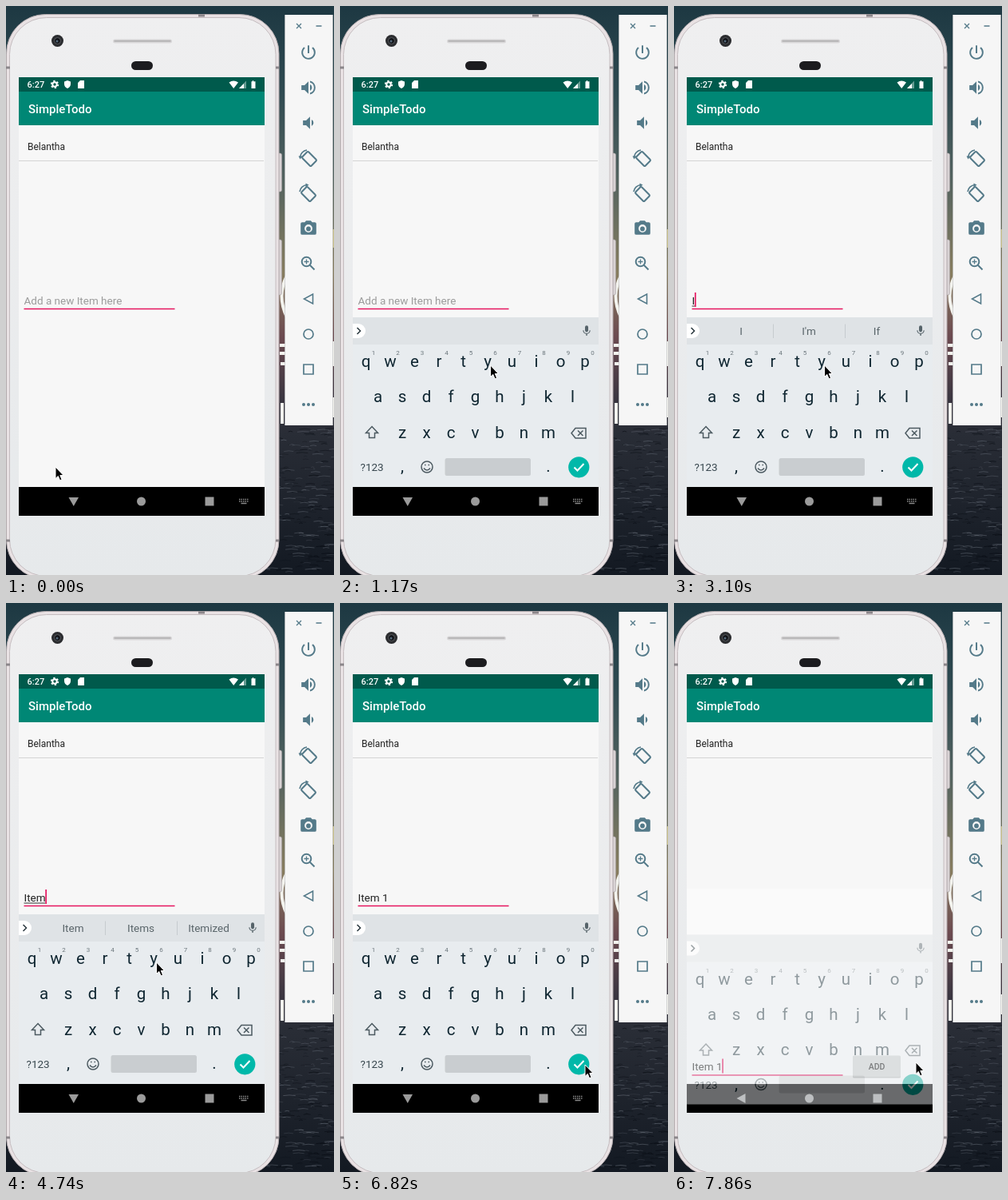
Write an HTML page that moves like this. It is 411 px wide and 711 px high and loops after 8 s.

```html
<!DOCTYPE html>
<html lang="en">
<head>
<meta charset="utf-8">
<title>Todo app demo</title>
<style>
  html, body { margin: 0; width: 100%; height: 100%; overflow: hidden; background: #10181f; }
  svg { display: block; width: 411px; height: 711px; font-family: Roboto, sans-serif; }
  .mid { text-anchor: middle; }
  .line { fill: none; stroke-width: 2; }
  #tools { fill: #547a89; }
  #tools .line { stroke: #547a89; }
  #keyboard .key { font-size: 20.5px; fill: #0f2631; }
  #keyboard .num { font-size: 8px; fill: #6a757b; }
  #words text { font-size: 13.5px; fill: #5a656a; }
</style>
</head>
<body>
<svg viewBox="0 0 411 711">
  <defs>
    <linearGradient id="sky" x2="0" y2="1">
      <stop offset="0" stop-color="#1d3842"/>
      <stop offset=".15" stop-color="#2f4a51"/>
      <stop offset=".3" stop-color="#52625f"/>
      <stop offset=".47" stop-color="#877d5f"/>
      <stop offset=".58" stop-color="#6c4a50"/>
      <stop offset=".69" stop-color="#3a3540"/>
      <stop offset=".75" stop-color="#292d36"/>
      <stop offset="1" stop-color="#131922"/>
    </linearGradient>
    <linearGradient id="shell" x2="0" y2="1">
      <stop offset="0" stop-color="#efeff0"/>
      <stop offset="1" stop-color="#e6e9eb"/>
    </linearGradient>
    <clipPath id="screenClip"><path d="M16 89H324V637H16Z"/></clipPath>
    <g id="rotate">
      <rect class="line" x="-5.500" y="-8" width="11" height="16" rx="1.500" stroke="#547a89" transform="translate(1 1) rotate(-45)"/>
      <path class="line" d="M-10.500 -1a10 10 0 0 1 8.500-9" stroke="#547a89" style="stroke-width:1.700"/>
      <path d="M-12.500 -2.500h5l-3 4Z"/>
    </g>
  </defs>

  <rect width="411" height="711" fill="url(#sky)"/>
  <g id="waves"></g>
  <g class="line" stroke="#f3f3ee" style="stroke-width:4">
    <path d="M352 337Q339 362 352 389M343 424H350M343 434H350M344 447H350M346 496V522M410 419V450M410 489V514"/>
    <path d="M410 279V302" stroke="#c9c08a"/>
  </g>

  <!-- phone shell -->
  <path d="M341 184h2.500q2 0 2 2v44q0 2-2 2H341ZM341 292h2.500q2 0 2 2v65q0 2-2 2H341Z" fill="#d9d3d5" stroke="#a9a3a6" stroke-width=".6"/>
  <rect x=".5" y="10.500" width="341.500" height="705.500" rx="49" fill="#e9e2e4" stroke="#b3abae"/>
  <rect x="4.500" y="14.500" width="333.500" height="698" rx="46" fill="url(#shell)" stroke="#c4bcbf"/>
  <path d="M241 12h8M0 77h5M338 77h4M0 668h5M338 668h4" stroke="#8b868a" stroke-width="3"/>
  <rect x="134" y="41.500" width="74" height="5" rx="2.500" fill="#d9d8d9"/>
  <path d="M135.500 43.800H206.500" stroke="#b5b3b4" stroke-width="2"/>
  <circle cx="64.500" cy="43.500" r="7.500" fill="#2b2c2f"/>
  <circle cx="64.500" cy="43.500" r="4" fill="#111318" stroke="#5a5c5f"/>
  <circle cx="64" cy="44" r="1.500" fill="#55697a"/>
  <rect x="157" y="69" width="27" height="11" rx="5.500" fill="#1c1c1f"/>

  <g clip-path="url(#screenClip)">
    <path d="M16 149H324V601H16Z" fill="#f7f7f7"/>
    <path d="M16 89H324V107H16Z" fill="#005a4c"/>
    <path d="M16 107H324V149H16Z" fill="#008775"/>
    <g fill="#fff">
      <text x="26.500" y="102" font-size="11" font-weight="500">6:27</text>
      <circle class="line" cx="61" cy="98" r="2.700" stroke="#fff"/>
      <circle class="line" cx="61" cy="98" r="4.200" stroke="#fff" stroke-dasharray="2.200"/>
      <path d="M77 93l4 1.600v3q0 3.800-4 5.400q-4-1.600-4-5.400v-3ZM93 93h5v10h-8v-7ZM279.500 95.500q5.500-4 11.500 0L285.200 103ZM310 93v1.200h2.500V103h-5V94.200H309V93Z"/>
      <path d="M301 93.500V103h-9Z" opacity=".4"/><path d="M298 97v6h-6Z"/>
      <text x="28" y="134" font-size="15" font-weight="500">SimpleTodo</text>
    </g>
    <text x="27" y="180" font-size="12" fill="#222">Belantha</text>
    <path d="M16 193.500H323" stroke="#d4d4d4"/>

    <path id="freed" d="M16 357H324V601H16Z" fill="#fafafa"/>
    <g id="field">
      <text id="entry" x="22.500" y="372.500" font-size="13.500"></text>
      <path id="composing" stroke="#333" stroke-width="1"/>
      <path d="M22.500 378.500H211.500" stroke="#e6165f" stroke-width="1.300"/>
      <rect id="caret" y="358" width="1.700" height="18" fill="#e6165f"/>
      <g id="add">
        <rect x="224" y="355" width="60" height="27" rx="1.500" fill="#bfc1c1"/>
        <rect x="224" y="354" width="60" height="26.500" rx="1.500" fill="#d3d5d5"/>
        <text class="mid" x="254" y="371.500" font-size="10.500" font-weight="500" fill="#222">ADD</text>
      </g>
    </g>

    <path d="M16 601H324V637H16Z"/>
    <g fill="#9b9b9b">
      <path id="back"/>
      <circle cx="169.500" cy="619" r="5.500"/>
      <path d="M249.500 613.500h11v11h-11Z"/>
      <g id="imeIcon" class="line" stroke="#8b8b8b" style="stroke-width:1.500">
        <path d="M292 616.500h12M292 619h12" stroke-dasharray="1.500 1"/>
        <path d="M294.500 621.500h7"/>
      </g>
    </g>

    <g id="keyboard">
      <path d="M16 389H324V601H16Z" fill="#e8ecef"/>
      <path d="M16 389H324V423H16Z" fill="#dfe3e6"/>
      <path d="M16 397h7a9 9 0 0 1 0 18h-7Z" fill="#fff"/>
      <path class="line" d="M21.500 402l4 4-4 4" stroke="#28363d" style="stroke-width:1.500"/>
      <g id="words">
        <path d="M124.500 397.500V415M214.500 397.500V415" stroke="#c6cbcf"/>
        <text class="mid" x="84" y="411"></text>
        <text class="mid" x="169" y="411"></text>
        <text class="mid" x="254" y="411"></text>
      </g>
      <path transform="translate(301 398) scale(.67)" fill="#56636a" d="M12 14a3 3 0 0 0 3-3V5a3 3 0 0 0-6 0v6a3 3 0 0 0 3 3zm5.300-3a5.300 5.300 0 0 1-10.600 0H5a7 7 0 0 0 6 6.720V21h2v-3.280A7 7 0 0 0 19 11z"/>
      <g id="keys"></g>
      <g class="line" stroke="#4c5a61" style="stroke-width:1.500">
        <path d="M40 525.500l7.500 8h-4v6h-7v-6h-4Z"/>
        <path d="M295 527.500h13v12.500h-13l-5-6.250ZM298 530.500l6.500 6.500M304.500 530.500l-6.500 6.500"/>
        <circle cx="109" cy="576" r="7"/>
        <path d="M105 577.500q4 5 8 0M106 573.500h1.500M110.500 573.500h1.500"/>
      </g>
      <text x="25.500" y="581" font-size="13.500" fill="#37464e">?123</text>
      <text class="key mid" x="78" y="582">,</text>
      <text class="key mid" x="261" y="582">.</text>
      <rect x="131.500" y="565" width="107.500" height="22" rx="2.500" fill="#c9cdd0"/>
      <circle id="done" cx="299.300" cy="576.300" r="13.100"/>
      <path class="line" d="M293.500 576.500l4 4 8-8.500" stroke="#fff"/>
    </g>
  </g>

  <!-- emulator tool strip -->
  <path d="M350 11H409V524H350Z" fill="#f6f6f6"/>
  <path d="M349.500 11V524M409.500 11V524" stroke="#c9cbcc" stroke-width=".8"/>
  <g id="tools">
    <path class="line" d="M364 22l6 6M370 22l-6 6M388.500 25h7" style="stroke-width:1.300"/>
    <g id="icons"></g>
    <use href="#rotate" transform="translate(379 190)"/>
    <use href="#rotate" transform="translate(378 234) scale(-1 1) rotate(90)"/>
    <circle cx="379" cy="278.500" r="2.900"/>
    <circle class="line" cx="376.500" cy="319.500" r="5.800"/>
    <path class="line" d="M380.500 323.500l6 6"/>
    <path class="line" d="M373.500 319.500h6M376.500 316.500v6" style="stroke-width:1.300"/>
    <path class="line" d="M384.500 360v12l-11-6Z" style="stroke-width:1.600"/>
    <circle class="line" cx="379" cy="410" r="6" style="stroke-width:1.700"/>
    <path class="line" d="M373 448h12v12h-12Z" style="stroke-width:1.700"/>
    <circle cx="373" cy="498" r="2"/><circle cx="379" cy="498" r="2"/><circle cx="385" cy="498" r="2"/>
  </g>

  <path id="mouse" d="M0 0V14.500L3.300 11.400 5.600 16.800 8 15.700 5.800 10.500H10Z" stroke="#fff"/>
</svg>

<script>
const LOOP = 8000;
const $ = id => document.getElementById(id);

function add(parent, tag, attrs, text = '') {
  const el = document.createElementNS('http://www.w3.org/2000/svg', tag);
  for (const name in attrs) el.setAttribute(name, attrs[name]);
  el.textContent = text;
  parent.append(el);
  return el;
}

// Static parts built from rules
let seed = 7;
const random = () => (seed = seed * 16807 % 2147483647) / 2147483647;
for (let i = 0; i < 260; i++) {
  const x = 300 + random() * 108, y = 526 + random() * 184, w = 4 + random() * 12;
  add($('waves'), 'path', {
    d: `M${x} ${y}q${w / 2} -1.5 ${w} 0`, fill: 'none',
    stroke: i % 2 ? '#6b727d' : '#05090f', opacity: .15 + random() * .4
  });
}

[['qwertyuiop', 32.5, 451], ['asdfghjkl', 47.5, 495], ['zxcvbnm', 78, 539.5]].forEach(([row, x0, y], r) => {
  [...row].forEach((letter, i) => {
    const x = x0 + i * 30.5;
    add($('keys'), 'text', { class: 'key mid', x, y }, letter);
    if (r === 0) add($('keys'), 'text', { class: 'num mid', x: x + 9.5, y: 436 }, (i + 1) % 10);
  });
});

const glyphs = [
  [58, 'M13 3h-2v10h2V3zm4.830 2.170l-1.420 1.420A6.920 6.920 0 0 1 19 12a7 7 0 1 1-11.410-5.420L6.170 5.170A9 9 0 1 0 21 12a8.940 8.940 0 0 0-3.170-6.830z'],
  [102, 'M3 9v6h4l5 5V4L7 9H3zm13.500 3A4.500 4.500 0 0 0 14 7.970v8.050A4.470 4.470 0 0 0 16.500 12zM14 3.230v2.060a7 7 0 0 1 0 13.420v2.060a9 9 0 0 0 0-17.540z'],
  [146, 'M18.500 12A4.500 4.500 0 0 0 16 7.970v8.050A4.470 4.470 0 0 0 18.500 12zM5 9v6h4l5 5V4L9 9H5z'],
  [278, 'M9 2L7.170 4H4a2 2 0 0 0-2 2v12a2 2 0 0 0 2 2h16a2 2 0 0 0 2-2V6a2 2 0 0 0-2-2h-3.170L15 2zm3 15a5 5 0 1 1 0-10 5 5 0 0 1 0 10z']
];
for (const [y, d] of glyphs) add($('icons'), 'path', { d, transform: `translate(379 ${y}) scale(.98) translate(-12 -12)` });

// Timeline: [start ms, values...]
const mousePath = [
  [0, 62, 576], [590, 74, 562], [740, 106, 525], [880, 147, 482], [1030, 179, 456], [1170, 188.5, 449],
  [5930, 238, 455], [6080, 330, 476], [6230, 347, 488], [6380, 346, 505], [6530, 337, 535],
  [6670, 321, 563], [6820, 307, 577], [6970, 303, 574]
];
const typing = [
  [0, '', 22.2], [2950, 'I', 25.9, true], [3550, 'It', 30.3, true], [3990, 'Ite', 37.4, true],
  [4740, 'Item', 49.3, true], [5190, 'Item ', 52.6], [5480, 'Item 1', 60.2]
];
const suggestions = [
  [0], [3100, 'I', "I'm", 'If'], [3700, 'It', "It's", 'Its'], [3990, 'Ite', 'Item', 'Its'],
  [4740, 'Item', 'Items', 'Itemized'], [5190, 'is', 'of', 'the'], [5480]
];
const keyboardStates = [[0, 0, 0], [140, 3, .9], [290, 0, 1], [7860, 25.5, .45]];
const caretToggles = [590, 1170, 1610, 2060, 2510, 4440, 4740, 5930, 6380, 6820, 7420];

const at = (steps, t) => steps.findLast(step => step[0] <= t).slice(1);
const show = (el, on) => el.setAttribute('visibility', on ? 'visible' : 'hidden');
const set = (id, name, value) => $(id).setAttribute(name, value);
const wordSlots = document.querySelectorAll('#words text');

function draw(t) {
  const [mx, my] = at(mousePath, t);
  set('mouse', 'transform', `translate(${mx} ${my})`);

  const [text, caretX, composing] = at(typing, t);
  $('entry').textContent = text || 'Add a new Item here';
  set('entry', 'fill', text ? '#222' : '#9c9c9c');
  set('composing', 'd', composing ? `M22.5 375H${caretX}` : '');
  set('caret', 'x', caretX);
  show($('caret'), caretToggles.filter(time => time <= t).length % 2);

  const words = at(suggestions, t);
  show($('words'), words.length);
  wordSlots.forEach((slot, i) => slot.textContent = words[i] || '');

  const [shift, opacity] = at(keyboardStates, t);
  set('keyboard', 'transform', `translate(0 ${shift})`);
  set('keyboard', 'opacity', opacity);
  set('done', 'fill', t >= 7570 ? '#00a294' : '#00b8a9');

  const closing = t >= 7860;
  set('field', 'transform', `translate(0 ${closing ? 211.5 : 0})`);
  show($('add'), closing);
  show($('freed'), closing);
  show($('imeIcon'), !closing);
  set('back', 'd', closing ? 'M89.500 613v12l-11-6Z' : 'M78.500 614h12.500l-6.250 11Z');
}

function tick() {
  draw(performance.now() % LOOP);
  requestAnimationFrame(tick);
}
tick();
</script>
</body>
</html>
```
